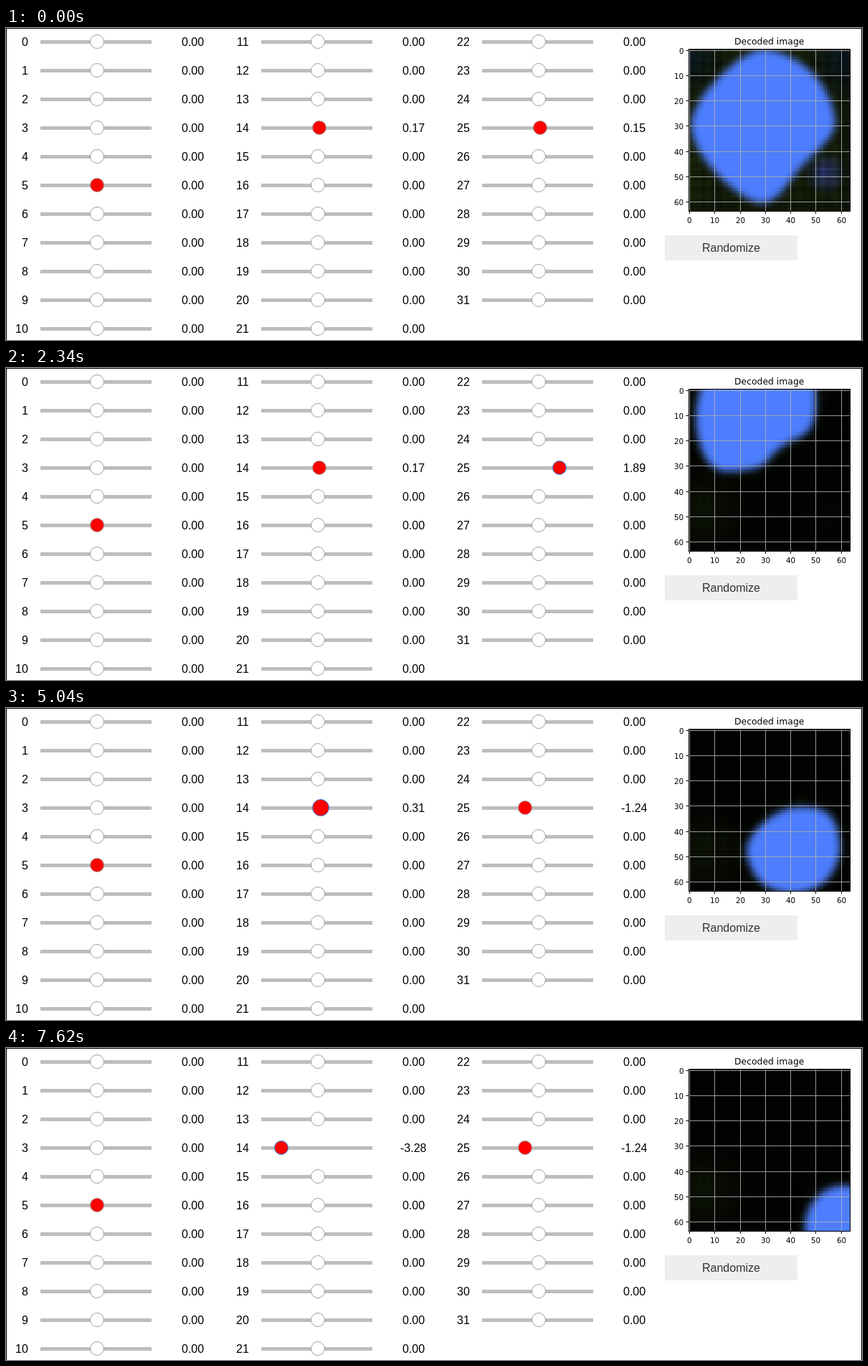
Animation of 1194x435 px, one loop 8000 ms. Source, as an HTML page with a canvas:

```html
<!DOCTYPE html>
<html lang="en">
<head>
<meta charset="utf-8">
<title>Latent sliders</title>
<style>
html, body { margin: 0; width: 100%; height: 100%; overflow: hidden; background: #fff; }
canvas { display: block; }
</style>
</head>
<body>
<canvas id="stage" width="1194" height="435"></canvas>
<script>
const LOOP = 8000, STEP = 60, GRID = 64, REDRAW_DELAY = 180;
const UI = '16px "Liberation Sans", Arial, sans-serif';
const PLOT = '"DejaVu Sans", sans-serif';
const OLIVE = '34,46,12', NAVY = '8,26,44', LILAC = '62,80,170';
const LEFT = 0, CENTER = 0.5, RIGHT = 1;
const ctx = document.getElementById('stage').getContext('2d');

const rest = { 14: 0.17, 25: 0.15 };
const focus = { 14: [4680, LOOP], 25: [540, 4980] };

// A blob is a centre and its reach in eight directions, clockwise from the right.
const blob = (x, y, ...reach) => ({ x, y, reach });
const full = blob(30, 30, 28, 22, 31, 27, 29, 26, 30, 28);
const corner = blob(28, 16, 24, 14, 18, 27, 26, 30, 20, 28);
const small = blob(27, 14, 22, 13, 17, 24, 24, 27, 18, 29);
const low = blob(42, 47, 18, 18, 18, 19, 19, 15.5, 16, 19);
const wide = blob(36, 44, 23.5, 22, 20, 24, 26, 15, 19, 24);
const tilted = blob(34, 42, 22, 19, 21, 22, 24, 14, 20, 25);
const round = blob(62, 62, ...Array(8).fill(16));

const drags = [
  { knob: 25, start: 1020, end: 1260, shown: 1440, to: 1.15, shape: corner },
  { knob: 25, start: 1680, end: 2100, shown: 2340, to: 1.89, shape: small },
  { knob: 25, start: 2640, end: 2940, shown: 3120, to: 0.65, shape: mix(full, corner, 0.5) },
  { knob: 25, start: 3300, end: 3780, shown: 3960, to: -1.24, shape: low },
  { knob: 14, start: 4980, end: 5280, shown: 5640, to: 1.49, shape: wide },
  { knob: 14, start: 5820, end: 6180, shown: 6360, to: 2.93, shape: tilted },
  { knob: 14, start: 6840, end: 7440, shown: 7620, to: -3.28, shape: round }
];

const pictures = [{ at: 0, canvas: decode(full, rest[25]) }];
const reached = { ...rest };
for (const d of drags) {
  d.from = reached[d.knob];
  reached[d.knob] = d.to;
  pictures.push({ at: d.shown, canvas: decode(d.shape, reached[25]) });
}

function lerp(a, b, p) {
  return a + (b - a) * p;
}

function mix(a, b, p) {
  return blob(lerp(a.x, b.x, p), lerp(a.y, b.y, p), ...a.reach.map((r, i) => lerp(r, b.reach[i], p)));
}

function random(seed) {
  return () => (seed = seed * 16807 % 2147483647) / 2147483647;
}

// Closed smooth curve through the eight ends of the blob's reach
function outline({ x, y, reach }) {
  const point = i => {
    const k = (i + 8) % 8, a = k * Math.PI / 4;
    return [x + reach[k] * Math.cos(a), y + reach[k] * Math.sin(a)];
  };
  const path = new Path2D();
  path.moveTo(...point(0));
  for (let i = 0; i < 8; i++) {
    const [p, q, r, s] = [-1, 0, 1, 2].map(k => point(i + k));
    const c1 = q.map((v, k) => v + (r[k] - p[k]) / 6);
    const c2 = r.map((v, k) => v - (s[k] - q[k]) / 6);
    path.bezierCurveTo(...c1, ...c2, ...r);
  }
  return path;
}

function decode(shape, value) {
  const canvas = document.createElement('canvas');
  canvas.width = canvas.height = GRID;
  const g = canvas.getContext('2d');
  const path = outline(shape);
  const warm = Math.max(0.06, 1 - Math.abs(value));
  const wash = color => {
    g.fillStyle = color;
    g.fillRect(0, 0, GRID, GRID);
  };
  const glow = (rgb, x, y, r, alpha) => {
    const fade = g.createRadialGradient(x, y, 0, x, y, r);
    fade.addColorStop(0, `rgba(${rgb},${alpha})`);
    fade.addColorStop(1, `rgba(${rgb},0)`);
    wash(fade);
  };
  const soft = (color, blur) => {
    g.filter = `blur(${blur}px)`;
    g.fillStyle = color;
    g.fill(path);
    g.filter = 'none';
  };
  wash('#010201');
  wash(`rgba(${OLIVE},${warm * 0.8})`);
  glow(OLIVE, 7, 48, 18, 0.5);
  glow(NAVY, GRID, 4, 18, warm);
  glow(NAVY, 0, 4, 14, warm);
  glow(LILAC, 54, 49, 9, warm);
  soft(`rgba(${OLIVE},.8)`, 3.5);
  // faint woven streaks behind the blob
  const rnd = random(77);
  for (let i = 0; i < GRID; i++) {
    g.fillStyle = `rgba(0,0,6,${rnd() * 0.3})`;
    g.fillRect(i, 0, 1, GRID);
    g.fillRect(0, i, GRID, 1);
  }
  soft('rgb(77,126,255)', 1.7);
  return canvas;
}

function text(str, x, y, font, align = LEFT, color = '#000') {
  ctx.font = font;
  ctx.fillStyle = color;
  ctx.fillText(str, Math.round(x - ctx.measureText(str).width * align), y);
}

function line(x1, y1, x2, y2) {
  ctx.beginPath();
  ctx.moveTo(x1, y1);
  ctx.lineTo(x2, y2);
  ctx.stroke();
}

function knobState(n, t) {
  const now = Math.floor(t / STEP) * STEP;
  const d = drags.findLast(d => d.knob === n && t >= d.start);
  if (!d) return { value: rest[n] || 0, held: false };
  const p = Math.min(1, (now - d.start) / (d.end - d.start));
  return { value: lerp(d.from, d.to, p * p * (3 - 2 * p)), held: t < d.shown - REDRAW_DELAY };
}

function drawSlider(n, t) {
  const col = Math.floor(n / 11), y = 19 + n % 11 * 40;
  const left = 48 + Math.round(col * 308.2);
  const { value, held } = knobState(n, t);
  const [on, off] = focus[n] || [LOOP, LOOP];
  text(n, left - 17, y + 6, UI, RIGHT);
  text(value.toFixed(2), left + 212.6, y + 6, UI, CENTER);
  ctx.fillStyle = '#bdbdbd';
  ctx.fillRect(left, y - 2, 155, 5);
  ctx.beginPath();
  ctx.arc(Math.round(left + 78.6 + value * 15.3), y, held ? 11.5 : 9.5, 0, 7);
  ctx.fillStyle = n === 5 || n in rest ? '#f00' : '#fff';
  ctx.fill();
  ctx.strokeStyle = t >= on && t < off ? '#2196f3' : '#9e9e9e';
  ctx.lineWidth = 1;
  ctx.stroke();
}

function drawPlot(t) {
  const x0 = 952, y0 = 29.5, size = 225.5, right = 1177.5, bottom = 255.5;
  const small = '10.35px ' + PLOT;
  const snap = v => Math.floor(v) + 0.5;
  ctx.imageSmoothingEnabled = false;
  ctx.drawImage(pictures.findLast(p => t >= p.at).canvas, x0, y0, size, size);
  text('Decoded image', 1064.5, 23, '12.4px ' + PLOT, CENTER);
  ctx.lineWidth = 1;
  for (let k = 0; k <= 60; k += 10) {
    const d = (k + 0.5) * size / GRID, x = snap(x0 + d), y = snap(y0 + d);
    ctx.strokeStyle = 'rgba(176,176,176,.85)';
    line(x, y0, x, bottom);
    line(x0, y, right, y);
    ctx.strokeStyle = '#000';
    line(x, bottom, x, bottom + 3.5);
    line(x0 - 3.5, y, x0, y);
    text(k, x, 272, small, CENTER);
    text(k, 945.3, y + 4, small, RIGHT);
  }
  ctx.strokeRect(snap(x0), y0, right - snap(x0), bottom - y0);
}

function draw() {
  const t = performance.now() % LOOP;
  ctx.fillStyle = '#fff';
  ctx.fillRect(0, 0, 1194, 435);
  for (let n = 0; n < 32; n++) drawSlider(n, t);
  drawPlot(t);
  ctx.fillStyle = '#eee';
  ctx.fillRect(919, 289, 185, 35);
  text('Randomize', 1011.5, 312, UI, CENTER, '#333');
  ctx.fillStyle = '#000';
  ctx.fillRect(0, 0, 1194, 1);
  ctx.fillRect(0, 0, 1, 435);
  ctx.fillRect(1193, 0, 1, 435);
  requestAnimationFrame(draw);
}
draw();
</script>
</body>
</html>
```
